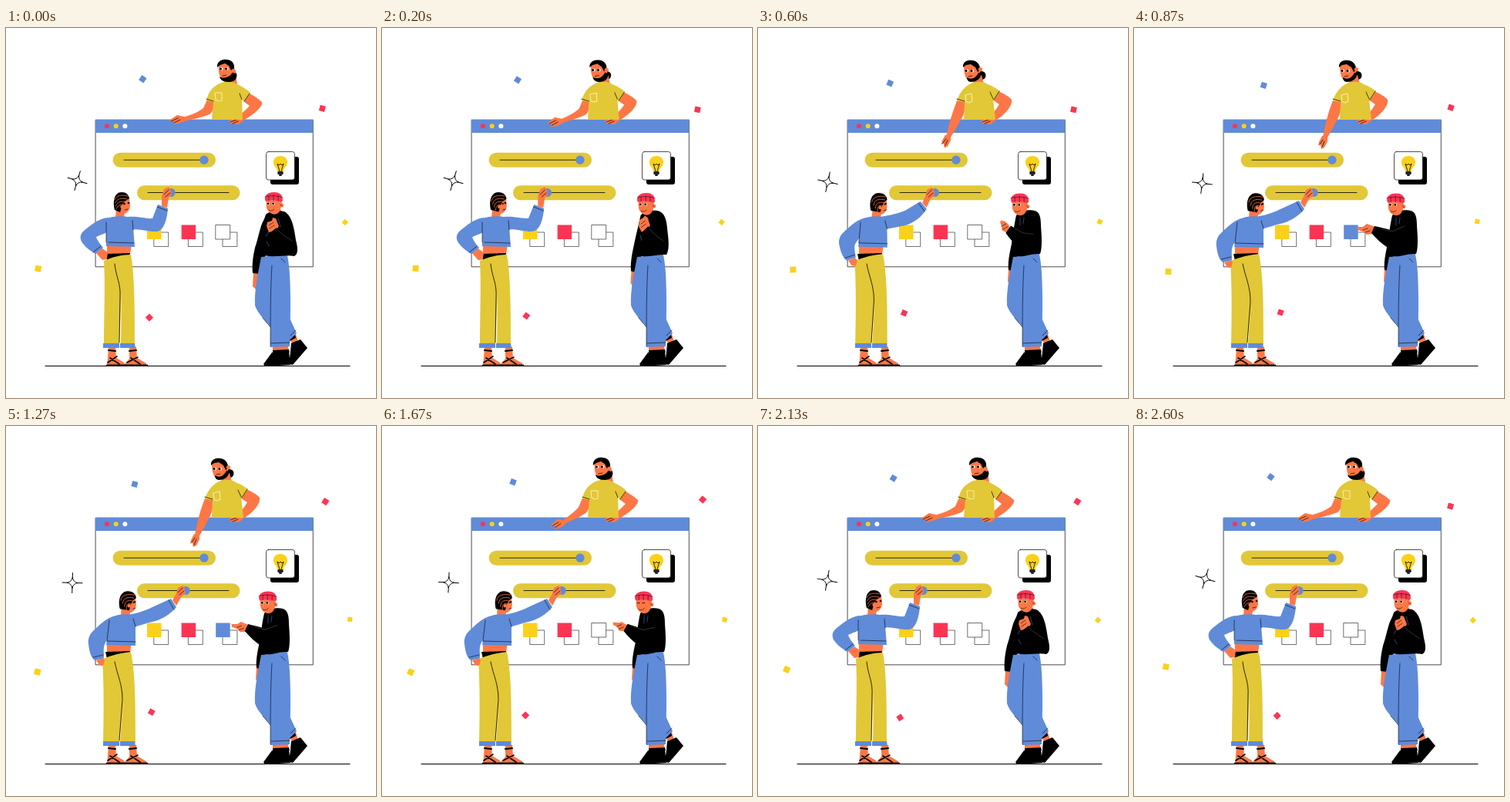
These frames come from a looping animation (480 by 480 pixels, 2.63 s). An HTML page with a canvas:

```html
<!DOCTYPE html>
<html lang="en">
<head>
<meta charset="utf-8">
<style>
html, body { margin: 0; width: 100%; height: 100%; overflow: hidden; background: #fff; }
canvas { display: block; }
</style>
</head>
<body>
<canvas id="stage" width="480" height="480"></canvas>
<script>
const ctx = document.getElementById('stage').getContext('2d');
const LOOP = 2630;
const BLUE = '#5f8bd9', MUSTARD = '#e2c737', YELLOW = '#fbd01a', RED = '#fc3454',
      SKIN = '#fd7746', BLACK = '#000', WHITE = '#fff';

const ramp = (t, a, b) => {
  const u = Math.min(1, Math.max(0, (t - a) / (b - a)));
  return u * u * (3 - 2 * u);
};
const pulse = (t, a, b, c, d) => ramp(t, a, b) - ramp(t, c, d);
const lerp = (a, b, k) => a + (b - a) * k;

// Blend two path strings that share the same commands.
const NUMBER = /-?[\d.]+/g;
function mix(a, b, k) {
  const end = b.match(NUMBER);
  let i = 0;
  return a.replace(NUMBER, n => lerp(+n, +end[i++], k).toFixed(2));
}

const fill = (color, a, b = a, k = 0) => {
  ctx.fillStyle = color;
  ctx.fill(new Path2D(mix(a, b, k)));
};
const line = (color, width, a, b = a, k = 0) => {
  ctx.strokeStyle = color;
  ctx.lineWidth = width;
  ctx.stroke(new Path2D(mix(a, b, k)));
};
const dot = (color, x, y, r) => {
  ctx.fillStyle = color;
  ctx.beginPath();
  ctx.arc(x, y, r, 0, 7);
  ctx.fill();
};
const box = (x, y, w, h, r, color, stroke) => {
  ctx.beginPath();
  ctx.roundRect(x, y, w, h, r);
  if (color) { ctx.fillStyle = color; ctx.fill(); }
  if (stroke) { ctx.strokeStyle = stroke; ctx.lineWidth = 0.7; ctx.stroke(); }
};
const shifted = (x, y, turn, draw) => {
  ctx.save();
  ctx.translate(x, y);
  ctx.rotate(turn * Math.PI / 180);
  draw();
  ctx.restore();
};

function drawWindow(knob, picked) {
  box(116.5, 119.5, 281.8, 190.3, 0, WHITE, BLACK);
  box(116, 118.5, 282.5, 17.5, 0, BLUE);
  [RED, YELLOW, WHITE].forEach((c, i) => dot(c, 131 + i * 11.7, 127.2, 3));

  box(138.7, 161.7, 133.3, 19, 9.5, MUSTARD);
  line(BLACK, 0.8, 'M153 171.2L252 171.2');
  dot(BLUE, 257, 171.2, 5.6);
  box(170, 204.2, 133.5, 19, 9.5, MUSTARD);
  line(BLACK, 0.8, 'M184 213.5L289 213.5');
  dot(BLUE, knob, 213.5, 5.6);

  [YELLOW, RED, picked ? BLUE : WHITE].forEach((c, i) => {
    const x = 183 + i * 44.6;
    box(x + 9.2, 265, 18.5, 18.5, 0, null, '#333');
    box(x, 255.5, 18.5, 18.5, 0, c, c === WHITE && '#333');
  });

  box(343, 167, 37, 36, 3, BLACK);
  box(337.5, 160.5, 37, 36.5, 3, WHITE, BLACK);
  fill(YELLOW, 'M352 186C352 181 347 180 347 174C347 169 351 166 356 166C361 166 365 169 365 174C365 180 360 181 360 186Z');
  line(BLACK, 0.8, 'M355 186L352 176L354 178L356 176L358 178L360 176L357 186');
  box(352.3, 186, 7.4, 4, 1, '#222');
  box(354, 190, 4, 2, 1, '#222');
}

function drawTopMan(look, reach) {
  dot(BLACK, lerp(294, 290, look), 61.5, 5.5);
  fill(SKIN, 'M283 64L298 61L300 73L284 75Z', 'M279 64L290 61L293 73L280 75Z', look);
  // arms
  fill(SKIN,
    'M261 93L271 96C270 103 269 108 264 112C254 116 243 118 231 121L229 116C240 113 250 109 256 104Z',
    'M258 94L269 96C269 104 268 110 265 116C260 126 256 134 250 144L245 141C247 130 250 118 253 108Z', reach);
  fill(SKIN, 'M231 115L222 113L213 119L212 122L220 121L216 125L224 124L232 121Z',
    'M251 142L244 140L240 148L239 153L242 151L243 157L247 155L251 147Z', reach);
  line(BLACK, 0.7, 'M214 121L223 117M218 123L226 119', 'M241 151L245 145M244 154L247 147', reach);
  fill(SKIN,
    'M308 95L316 85C323 89 328 92 332 96C333 99 330 103 327 106C321 112 312 118 304 122L298 117C305 112 311 106 316 101Z',
    'M304 93L312 82C320 86 326 89 329 93C330 97 327 102 325 105C320 112 312 118 304 122L298 117C304 112 309 106 313 99Z', look);
  fill(SKIN, 'M304 117L296 116L289 121L291 124L302 125L308 120Z');
  line(BLACK, 0.7, 'M291 122L299 119M294 124L301 121');
  // shirt
  fill(MUSTARD,
    'M277 72C284 69 294 69 300 73C307 76 313 80 317 84L309 96L306 92L307 119L267 119L269 96L260 94C262 86 265 78 277 72Z',
    'M276 72C284 69 292 69 298 73C306 76 310 79 314 82L306 94L305 92L308 119L267 119L268 96L258 94C261 86 266 77 276 72Z', look);
  line(BLACK, 0.7, 'M260 92L269 95M306 93L303 85M309 95L316 85', 'M258 92L268 95M305 92L301 83M306 93L313 82', look);
  line('#f7eb9c', 1.2, 'M271 84L280 84L280 94L276 95L272 93Z', 'M269 87L277 85L278 95L274 97L270 96Z', look);
  // head
  fill(SKIN,
    'M276 48C283 45 290 46 296 52L298 56L297 64L283 67C278 66 275 60 276 48Z',
    'M267 49C274 45 281 46 286 52L288 58L285 66L275 69C270 68 267 60 267 49Z', look);
  fill(BLACK,
    'M274 51C273 44 280 40 286 41C293 41 297 46 296 53L292 55L289 49L284 46L278 48Z',
    'M266 51C265 45 271 41 277 42C284 42 289 48 288 55L285 57L282 51L276 47L270 48Z', look);
  fill(BLACK,
    'M277 63C280 65 284 65 288 63C291 62 293 59 294 57L298 60C301 66 296 70 289 70C281 70 278 67 277 63Z',
    'M271 64C274 66 277 66 280 65C283 63 285 60 286 58L289 59C290 65 284 70 276 70C273 70 271 67 271 64Z', look);
  for (const x of [279, 286]) {
    const ex = lerp(x, x - 8.5, look), ey = lerp(53, 55.5, look);
    dot(WHITE, ex + 0.6, ey, 2);
    dot(BLACK, ex - 0.4, ey, 1.5);
  }
  line(BLACK, 0.7, 'M281 62L286 61', 'M273 63L278 62', look);
  dot(SKIN, lerp(295, 288.5, look), lerp(55.5, 53.5, look), 2.6);
}

function drawWoman(k, turn) {
  // feet
  fill(SKIN, 'M133 414L142 414L143 428L153 434L154 437L131 437L132 428Z');
  fill(SKIN, 'M160 414L169 414L170 428L182 435L182 437L153 437L160 429Z');
  line(BLACK, 2, 'M131 437.5L154 437.5M153 437.5L183 437.5M133 418L142 419M160 419L169 418');
  line(BLACK, 1.6, 'M132 434L144 426M135 428L147 436M157 434L171 427M162 428L174 436');
  // hand on the hip, midriff, trousers
  fill(SKIN, 'M131 280L163 280L161 294L131 295Z');
  fill(BLACK, 'M129 293L161 292L160 295L131 302Z');
  fill(MUSTARD,
    'M127 302C138 297 150 294 162 294C167 320 167 370 167 411L149 411L150 340L147 411L127 411C127 370 129 335 127 302Z',
    'M125 302C138 297 150 294 162 293C168 320 168 370 168 411L148 411L152 355L147 411L126 411C127 370 127 335 125 302Z', k);
  fill(BLUE, 'M126 409L147 409L147 415L126 415ZM148 409L167 409L168 415L148 415Z');
  line(BLACK, 0.8, 'M141 306C143 325 149 330 148 350L147 408', 'M141 306C145 325 151 335 151 355L147 408', k);
  fill(SKIN, 'M117 292L125 286L132 291L131 300L125 301Z', 'M117 304L126 301L128 304L126 311L121 310Z', k);
  // hand on the slider
  fill(SKIN,
    'M202 231L202 218L205 209L211 206L214 211L215 216L211 220L209 233Z',
    'M216 226L221 217L223 210L229 207L232 211L233 217L227 222L221 233Z', k);
  line(BLACK, 0.7, 'M205 216L211 210M207 219L213 214', 'M223 216L229 210M225 219L231 214', k);
  // neck and sweater
  fill(SKIN, 'M143 232L154 238L153 247L142 247Z', 'M150 232L162 238L160 247L149 247Z', k);
  fill(BLUE,
    'M130 247C138 244 152 243 164 246L167 284L130 283L130 265Z',
    'M137 248C145 244 155 243 168 246L168 285L130 284L133 265Z', k);
  fill(BLUE,
    'M132 246C120 247 108 257 100 264C95 269 96 275 100 280C105 286 111 290 116 293L126 285C122 280 118 275 117 271C123 268 130 266 133 264Z',
    'M140 247C132 248 121 258 114 265C108 270 106 277 107 283C108 292 110 300 115 304L127 301C127 293 126 288 128 283C131 276 136 270 138 264Z', k);
  fill(BLUE,
    'M158 245C172 244 182 248 190 247L197 229L210 234C209 246 206 262 196 264C186 265 172 259 160 262Z',
    'M158 245C172 243 184 238 192 234L214 224L221 235C214 244 200 252 190 254C180 256 172 260 160 262Z', k);
  line(BLACK, 0.6,
    'M130 252L130 278M165 262L164 250M196 232L209 237M113 291L123 283M133 278L166 279',
    'M134 252L131 279M168 260L165 250M211 226L218 238M113 300L126 297M131 279L168 280', k);
  // head
  shifted(7.8 * k + 1.2 * turn * (1 - k), 1.2 * k, 0, () => {
    fill(SKIN, 'M146 221L160 220L161 230C161 236 157 241 152 241L144 238Z');
    fill(BLACK,
      'M141 236C138 224 141 213 150 213C156 213 159 216 160 221L154 225L151 229L148 239Z',
      'M140 236C137 224 141 213 150 213C157 213 161 217 161 222L157 225L154 231L152 238L148 240Z', turn);
    for (let i = 0; i < 4; i++) {
      const y = 217 + i * 4;
      line(SKIN, 0.8,
        `M${141 + i * 0.6} ${y + 6}C${143 + i} ${y} 150 ${y - 1} ${158 - i * 1.5} ${y + 1}`,
        `M${141 + i * 2.5} ${y + 8}C${142 + i * 2} ${y + 1} 150 ${y - 1} ${159 - i} ${y + 1}`, turn);
    }
    dot(SKIN, lerp(150.5, 152, turn), 232, 2.2);
    dot(BLACK, 153.5 + 4 * turn, 228, 1.3 - 0.5 * turn);
    dot(BLACK, 159, 227, 1.3);
    line(BLACK, 0.7, 'M154 236L158 235', 'M157 236L160 235', turn);
  });
}

function drawRightMan(turn, reach, blink) {
  // far arm
  fill(SKIN, 'M321 317L329 318L327 330L324 339L320 335Z', 'M325 313L331 314L331 325L327 335L324 328Z', turn);
  fill(BLACK,
    'M337 246C330 252 328 272 323 285C320 298 319 308 320 318L330 319C331 305 337 295 342 285Z',
    'M336 250C333 258 330 270 329 280C326 294 324 304 325 314L333 316C333 305 337 295 342 285Z', turn);
  // legs and shoes
  fill(SKIN, 'M366 398L375 394L379 407L371 410ZM346 412L366 412L367 422L346 422Z');
  fill(BLACK, 'M366 402L375 398L376 402L368 406ZM346 418L367 417L368 421L346 423Z');
  fill(BLACK, 'M370 409L382 404L391 415L372 437L367 436L369 420Z');
  fill(BLACK, 'M345 421L367 420L369 437L336 439L334 436Z');
  fill(BLUE, 'M331 297C327 318 322 340 323 360C326 370 338 381 345 390L368 405L377 396L366 372L360 295Z');
  fill(BLUE, 'M331 298L364 291C371 315 369 380 368 413L343 414C343 380 344 340 344 310Z',
    'M331 298L364 290C371 312 369 380 368 413L343 414C343 380 344 340 344 310Z', turn);
  line(BLACK, 0.6, 'M345 308C343 340 343 380 343 413M344 409L368 408M357 299L362 304M369 399L376 392M333 376L343 388');
  // neck and hoodie
  shifted(-7.8 * turn, 1.6 * turn, 0, () => fill(SKIN, 'M344 236L356 234L358 243L347 247Z'));
  fill(BLACK,
    'M337 242C343 237 358 235 364 240C372 247 374 262 376 275C379 287 379 293 374 296C362 293 342 300 331 293C328 280 331 258 337 242Z',
    'M335 243C341 237 352 235 359 237C366 239 367 247 367 257C368 270 369 285 366 293C352 292 338 301 331 293C328 285 331 262 335 243Z', turn);
  // head
  shifted(-7.8 * turn, 1.6 * turn, 0, () => {
    fill(SKIN, 'M338 223L357 224L358 229L356 235C355 240 350 243 345 241C340 239 336 234 338 223Z');
    dot(SKIN, 357.5, 230, 2.6);
    fill(RED, 'M336 223C335 216 341 213 348 213C356 213 359 217 359 224L357 226C350 223 343 223 337 225Z');
    line(BLACK, 0.5, 'M336 219C343 217 352 217 359 220M341 218L341 224M347 217L347 224M353 218L353 224');
    for (const x of [340.5, 347]) {
      if (blink) line(BLACK, 0.8, `M${x - 1.5} 228L${x + 1.5} 228`);
      else {
        dot(WHITE, x, 227.8, 1.9);
        dot(BLACK, x - 0.3, 227.8, 1.4);
      }
    }
    line(BLACK, 0.6, 'M341 236C343 238 346 237 348 235M356 229L358 231');
  });
  line('#39588c', 0.8, 'M353 247L356 258M341 264L337 270M338 277L341 283', 'M340 246L340 256M345 246L344 254M334 265L334 271', turn);
  // near arm
  const folded = (a, b) => mix(a, b, turn);
  fill(SKIN, folded(
    'M341 265L338 257L339 252L345 250L346 246L350 247L354 257L350 263Z',
    'M334 264L330 258L331 247L335 244L338 242L341 245L344 255L341 262Z'),
    'M310 267L302 268L297 264L290 262L289 258L297 258L302 254L313 258Z', reach);
  line(BLACK, 0.6, folded('M341 256L347 252M342 260L348 256', 'M333 253L338 249M333 258L339 253'),
    'M297 262L303 260M300 265L306 263', reach);
  fill(BLACK, folded(
    'M351 259C352 262 355 264 358 266L376 280L372 292C364 291 350 282 341 267Z',
    'M342 256C344 260 348 264 350 266L367 280L364 292C354 291 341 282 333 266Z'),
    'M312 257C320 259 328 260 335 263L362 270L362 290C340 296 324 284 308 266Z', reach);
  line('#555', 0.6, folded('M352 262L359 268L371 276', 'M343 259L350 267L362 277'), 'M322 261L335 264L351 257', reach);
}

const CONFETTI = [
  // color, size, x, y, x swing, y swing, peak time, turn, turn swing
  [BLUE, 7.4, 172.2, 70.8, 5.4, -4.8, -130, 25, 10],
  [RED, 7.4, 412.5, 101, 3.5, -5.5, 1700, 25, 15],
  [YELLOW, 6, 443, 251.5, 3.3, -0.6, 1200, 25, -20],
  [RED, 7.2, 187.2, 373.6, 2.9, -4.6, 850, 38, -18]
];
const wave = (t, peak) => Math.cos((t - peak) / LOOP * 2 * Math.PI);

const chip = (color, size, x, y, turn) =>
  shifted(x, y, turn, () => box(-size / 2, -size / 2, size, size, 0, color));

function drawFloaters(t) {
  for (const [color, size, x, y, dx, dy, peak, turn, swing] of CONFETTI) {
    const c = wave(t, peak);
    chip(color, size, x + dx * c, y + dy * c, turn + swing * c);
  }
  const c = wave(t, 590);
  chip(YELLOW, 7.8, 41 + 4.4 * c, 315.7 - 3.9 * wave(t, 185), 12 - 14 * c);

  const s = wave(t, 100);
  shifted(89.3 + 3.4 * s, 200.8 - 2.8 * s, 9 + 8 * s, () => {
    line(BLACK, 1, 'M0 -13L0 -6M13 0L6 0M0 13L0 6M-13 0L-6 0');
    line(BLACK, 0.9, 'M0 -7Q1 -1 7 0Q1 1 0 7Q-1 1 -7 0Q-1 -1 0 -7Z');
  });
}

function draw(t) {
  ctx.fillStyle = WHITE;
  ctx.fillRect(0, 0, 480, 480);
  ctx.lineJoin = ctx.lineCap = 'round';

  const slide = pulse(t, 150, 780, 1690, 2110);
  const turn = pulse(t, 20, 330, 1690, 2080);
  const tap = ramp(t, 420, 800) - 0.07 * ramp(t, 900, 1300)
    - 0.15 * ramp(t, 1350, 1650) - 0.78 * ramp(t, 1680, 2030);

  drawWindow(lerp(214, 233, slide), t > 770 && t < 1450);
  drawTopMan(pulse(t, 30, 340, 1330, 1700), pulse(t, 80, 680, 1370, 1830));
  line(BLACK, 1.2, 'M51 438.5L446 438.5');
  drawWoman(slide, turn);
  drawRightMan(turn, tap, t > 1620 && t < 1740);
  drawFloaters(t);
}

function tick() {
  draw(performance.now() % LOOP);
  requestAnimationFrame(tick);
}
tick();
</script>
</body>
</html>
```
